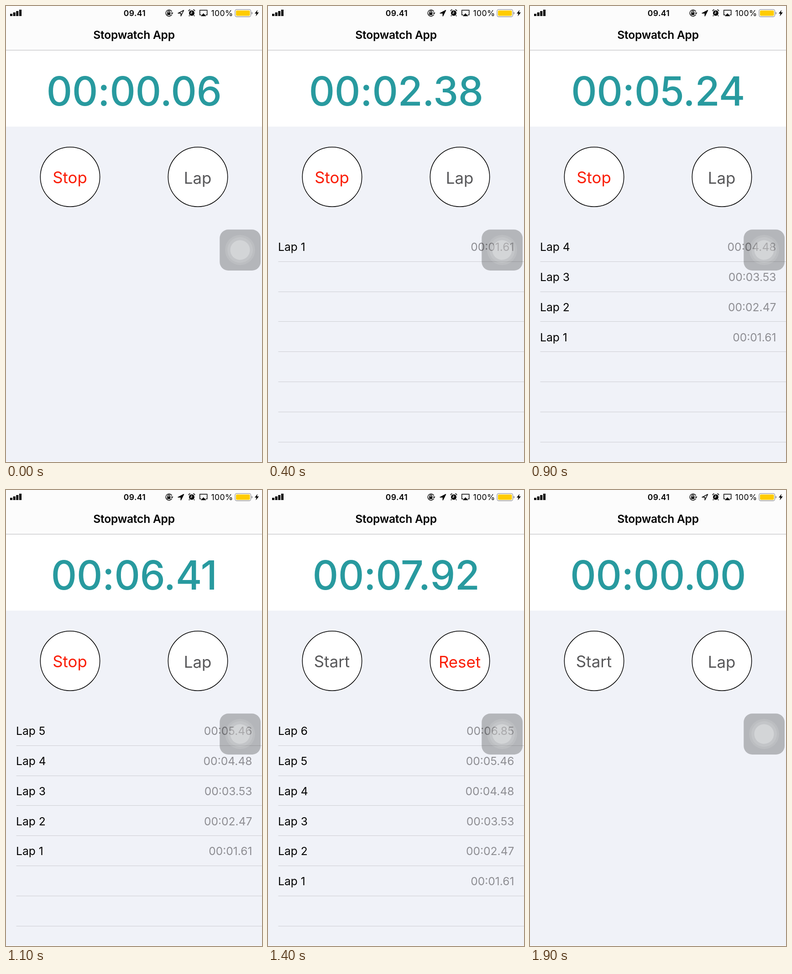
An HTML page that plays this animation: 561 by 998 pixels, repeating every 2000 ms.

```html
<!DOCTYPE html>
<html lang="en">
<head>
<meta charset="utf-8">
<title>Stopwatch</title>
<style>
  html, body { margin: 0; width: 100%; height: 100%; overflow: hidden; background: #fff; }
  svg { display: block; width: 561px; height: 998px; font-family: Inter, "Liberation Sans", sans-serif; }
  .title { font-size: 24.6px; font-weight: 600; letter-spacing: -.01em; }
  .status { font-size: 17.6px; letter-spacing: .02em; }
  .clock { font-size: 88px; font-weight: 500; letter-spacing: -.006em; fill: #289a9f; }
  .button { font-size: 34.8px; }
  .row { font-size: 24.6px; }
  .row .time { fill: #8e8e93; }
  .middle { text-anchor: middle; }
  .time { text-anchor: end; }
  .line { fill: none; stroke: #000; stroke-width: 1.5; }
</style>
</head>
<body>
<svg viewBox="0 0 561 998">
  <rect width="561" height="998" fill="#fff"/>
  <rect width="561" height="96" fill="#fcfcfc"/>
  <rect y="96" width="561" height="1.3" fill="#c6c6c8"/>
  <rect y="264" width="561" height="733" fill="#f0f2f8"/>

  <!-- status bar -->
  <path d="M9 17h5v5H9zM15.7 14h5v8h-5zM22.3 11h5v11h-5zM29 8h5v14h-5z"/>
  <text class="status middle" x="282" y="22" font-weight="600">09.41</text>
  <g class="line">
    <path d="M363.6 18.5A7 7 0 1 1 363.6 12.5"/>
    <path d="M354.6 15v-2a2.2 2.2 0 0 1 4.4 0v2"/>
    <path id="arrow" d="M377 15.8L389.5 9.5L383.3 22V15.8Z" stroke-linejoin="round"/>
    <path d="M428 19.5h-3.2V9.2h15.9v10.3h-3.2"/>
    <path d="M400.3 11.2a3 3 0 0 1 3.6-3M410.1 8.2a3 3 0 0 1 3.6 3M402.3 20.5l-1.5 1.8M411.7 20.5l1.5 1.8"/>
  </g>
  <path d="M353.3 14.3h7v5.4h-7zM361.2 14.5h5.4l-2.7 3.5zM432.7 16l6 6.3h-12z"/>
  <circle cx="407" cy="15.6" r="6"/>
  <path d="M407 11.5v4.3h-3.2" fill="none" stroke="#fff" stroke-width="1.3"/>
  <text class="status" x="449.5" y="22">100%</text>
  <rect x="502" y="7.7" width="34.5" height="15.8" rx="3.5" fill="#fff" stroke="#96969a" stroke-width="1.3"/>
  <rect x="504" y="9.7" width="30.5" height="11.8" rx="2" fill="#ffcc00"/>
  <path d="M538 12.7q2.3.6 2.3 2.9t-2.3 2.9z" fill="#96969a"/>
  <path d="M551.3 8.5L545 16.4h3.8l-1.4 6.1l6.6-8.4h-4z"/>

  <text class="title middle" x="280.5" y="72">Stopwatch App</text>
  <text class="clock middle" id="clock" x="280.5" y="218"></text>

  <g class="button middle">
    <circle cx="140.5" cy="374" r="65.2" fill="#fff" stroke="#000" stroke-width="1.5"/>
    <circle cx="420.5" cy="374" r="65.2" fill="#fff" stroke="#000" stroke-width="1.5"/>
    <text id="left" x="140" y="387.5"></text>
    <text id="right" x="420" y="388.5"></text>
  </g>

  <g id="list"></g>

  <!-- floating touch button -->
  <rect x="468.3" y="489.3" width="89.7" height="89.7" rx="19" fill="#000" fill-opacity=".25"/>
  <g fill="#fff">
    <circle cx="513" cy="534" r="33" fill-opacity=".1"/>
    <circle cx="513" cy="534" r="28" fill-opacity=".11"/>
    <circle cx="513" cy="534" r="21.5" fill-opacity=".27"/>
  </g>
</svg>
<script>
  const STEP = 100, LOOP = 2000, STOPPED_AT = 14;
  const ROWS = 7, ROW_HEIGHT = 65.85;
  const RED = '#fa1e08', GREY = '#58585a';
  // hundredths of a second
  const readings = [6, 64, 122, 180, 238, 296, 353, 411, 468, 524,
                    583, 641, 700, 758, 792, 792, 792, 792, 0, 0];
  const laps = [161, 247, 353, 448, 546, 685];

  const byId = id => document.getElementById(id);
  const pad = n => String(n).padStart(2, '0');
  const format = t => `00:${pad(Math.floor(t / 100))}.${pad(t % 100)}`;

  function add(parent, tag, attributes) {
    const node = document.createElementNS('http://www.w3.org/2000/svg', tag);
    for (const [key, value] of Object.entries(attributes)) node.setAttribute(key, value);
    return parent.appendChild(node);
  }

  const rows = Array.from({ length: ROWS }, (_, i) => {
    const group = add(byId('list'), 'g', { class: 'row' });
    const y = 536 + i * ROW_HEIGHT;
    add(group, 'rect', { x: 22.5, y: Math.round(y + 22.7), width: 538.5, height: 1, fill: '#cdced3' });
    return {
      name: add(group, 'text', { x: 22, y }),
      time: add(group, 'text', { x: 539.5, y, class: 'time' })
    };
  });

  function label(id, text, color) {
    byId(id).textContent = text;
    byId(id).setAttribute('fill', color);
  }

  function draw(step) {
    const now = readings[step];
    const running = step < STOPPED_AT;
    const taken = laps.filter(lap => lap <= now);

    byId('clock').textContent = format(now);
    label('left', running ? 'Stop' : 'Start', running ? RED : GREY);
    const canReset = !running && now > 0;
    label('right', canReset ? 'Reset' : 'Lap', canReset ? RED : GREY);
    byId('arrow').setAttribute('fill', step > 1 && step < 19 ? '#000' : 'none');

    byId('list').setAttribute('visibility', taken.length ? 'visible' : 'hidden');
    rows.forEach((row, i) => {
      const number = taken.length - i;
      row.name.textContent = number > 0 ? `Lap ${number}` : '';
      row.time.textContent = number > 0 ? format(taken[number - 1]) : '';
    });
  }

  const start = performance.now();
  let shown = -1;
  function tick() {
    const step = Math.floor((performance.now() - start) % LOOP / STEP);
    if (step !== shown) draw(shown = step);
    requestAnimationFrame(tick);
  }
  tick();
</script>
</body>
</html>
```
